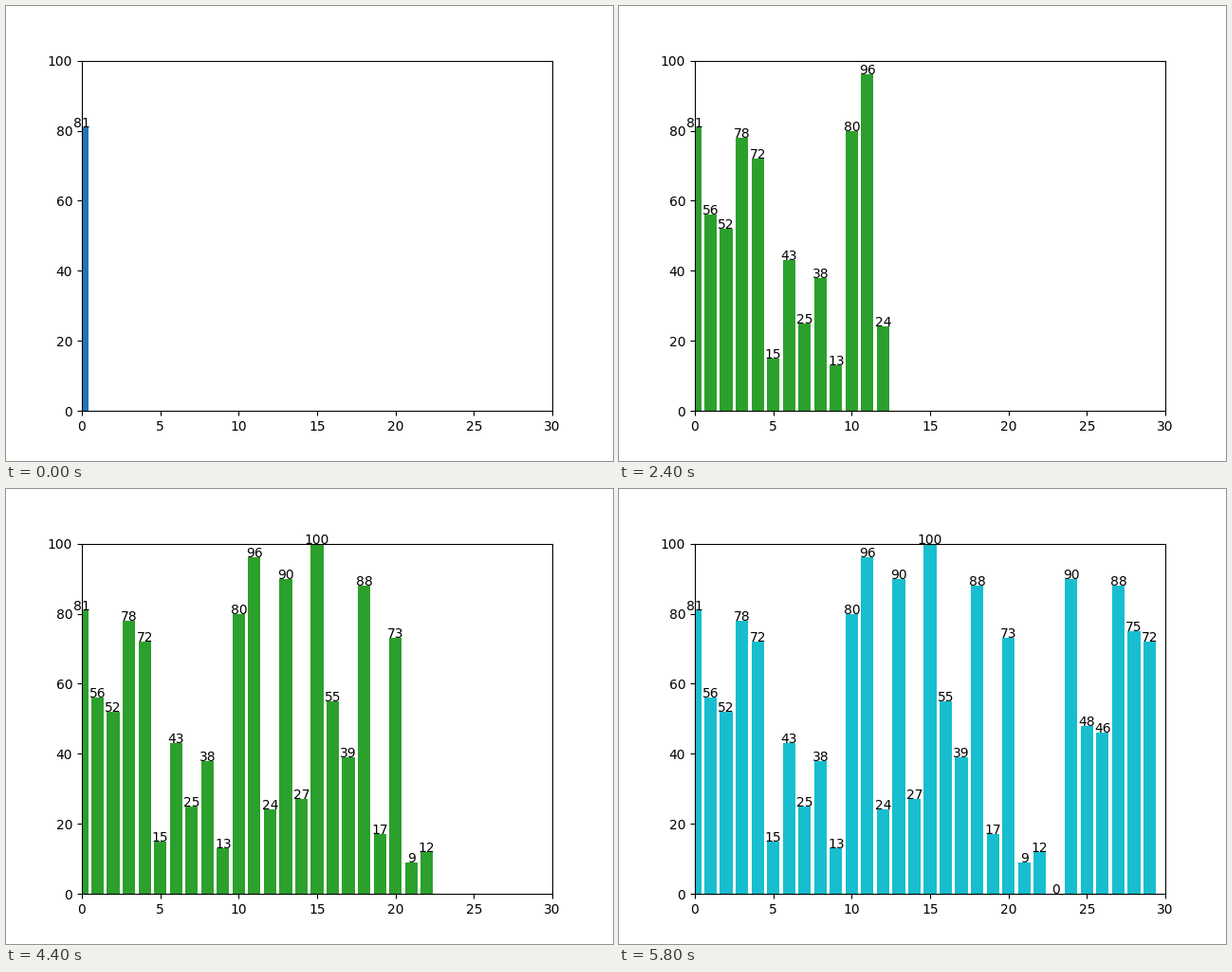
Recreate the animation shown at these times as a matplotlib script. Size 640x480 px, loop 6 s.

```python
import matplotlib.pyplot as plt
from matplotlib.animation import FuncAnimation

VALUES = [81, 56, 52, 78, 72, 15, 43, 25, 38, 13,
          80, 96, 24, 90, 27, 100, 55, 39, 88, 17,
          73, 9, 12, 0, 90, 48, 46, 88, 75, 72]
COUNT = len(VALUES)

fig, ax = plt.subplots(figsize=(6.4, 4.8), dpi=100)
ax.set_xlim(0, COUNT)
ax.set_ylim(0, 100)

bars = ax.bar(range(COUNT), VALUES)
labels = [ax.text(x, v, str(v), ha="center") for x, v in enumerate(VALUES)]
ax.set_xlim(0, COUNT)
ax.set_ylim(0, 100)


def update(step):
    """Reveal one more bar and move all bars to the next cycle colour."""
    for x, (bar, label) in enumerate(zip(bars, labels)):
        bar.set_visible(x <= step)
        bar.set_facecolor(f"C{step % 10}")
        label.set_visible(x <= step)
    return [*bars, *labels]


anim = FuncAnimation(fig, update, frames=COUNT, interval=200,
                     init_func=lambda: update(0), repeat=True, repeat_delay=0)
plt.show()
```
